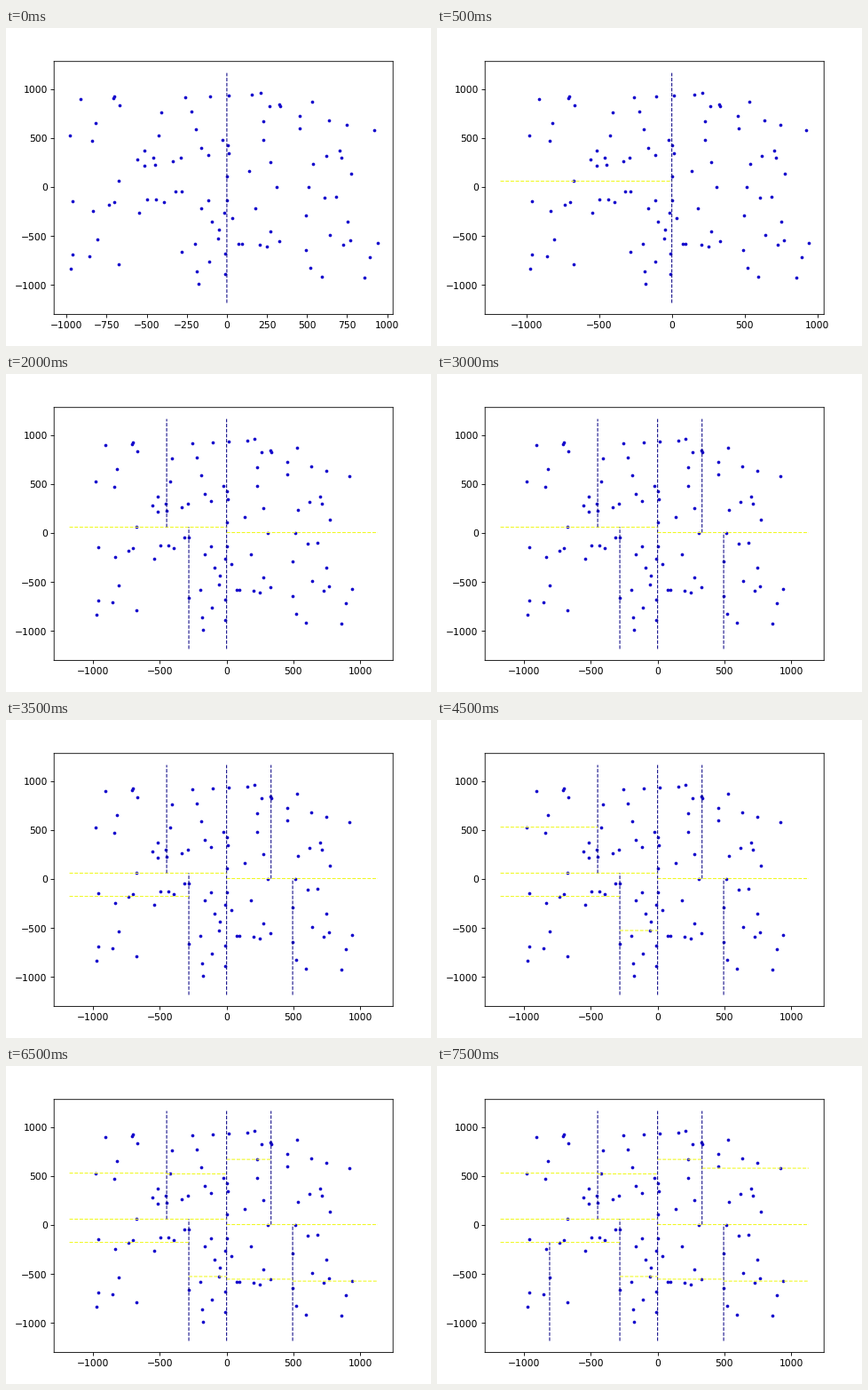
A matplotlib script that plays this animation: 479x358 px, repeating every 8000 ms.

```python
import matplotlib.pyplot as plt
import numpy as np
from matplotlib.animation import FuncAnimation

W, H, DPI = 479, 358, 72  # at 72 dpi one point is one pixel
SCALE = 77 / 72
INTERVAL = 500
COUNT, LEAVES = 100, 16

DOT = "#1408cc"
LINE = ["#0d0887", "#f0f921"]  # splits on x, splits on y
LOW, HIGH = np.array([-981, -985]), np.array([943, 970])

# Median points of the k-d tree in level order; the axis alternates by depth.
MEDIANS = [
    (0, 105),
    (-676, 60), (512, 5),
    (-283, -657), (-449, 231), (495, -294), (333, 824),
    (-737, -177), (-55, -525), (-981, 530), (-425, 522),
    (329, -552), (940, -572), (227, 670), (921, 580),
    (-809, -538),
]


def build_tree():
    """Return the split segments as (axis, xs, ys) and the deepest full level of cells."""
    cells = [(1.2 * LOW, 1.2 * HIGH)]
    segments = []
    for i, point in enumerate(MEDIANS):
        lo, hi = cells[i]
        axis = ((i + 1).bit_length() - 1) % 2
        cut_lo, cut_hi = lo.copy(), hi.copy()
        cut_lo[axis] = cut_hi[axis] = point[axis]
        segments.append((axis, *zip(cut_lo, cut_hi)))
        cells += [(lo, cut_hi), (cut_lo, hi)]
    return segments, cells[LEAVES - 1:2 * LEAVES - 1]


def scatter_points(cells):
    """Share the remaining points evenly among the cells, as medians would."""
    rng = np.random.default_rng(7)
    pts = list(MEDIANS)
    for i in range(COUNT - len(MEDIANS)):
        lo, hi = np.clip(cells[i % LEAVES], LOW, HIGH)
        pts.append(rng.uniform(lo, hi))
    return np.array(pts)


plt.rcParams.update({
    "font.family": "DejaVu Sans",
    "font.size": 10 * SCALE,
    "text.hinting": "none",
    "path.snap": False,
    "axes.linewidth": 0.8 * SCALE,
    "lines.linewidth": SCALE,
})
for k in "xy":
    plt.rcParams.update({
        f"{k}tick.major.size": 3.5 * SCALE,
        f"{k}tick.major.width": 0.8 * SCALE,
        f"{k}tick.major.pad": 3.5 * SCALE,
    })

fig = plt.figure(figsize=(W / DPI, H / DPI), dpi=DPI)
ax = fig.add_axes([54.2 / W, 35.6 / H, 382 / W, 284.7 / H])
segments, leaves = build_tree()
cloud = scatter_points(leaves)


def update(step):
    ax.cla()
    ax.plot(*cloud.T, "o", color=DOT, ms=3.7, mew=0)
    for axis, xs, ys in segments[:step + 1]:
        ax.plot(xs, ys, "--", color=LINE[axis])
    return ax.lines


anim = FuncAnimation(fig, update, frames=len(MEDIANS), init_func=lambda: [],
                     interval=INTERVAL, repeat=True, repeat_delay=0)
plt.show()
```
